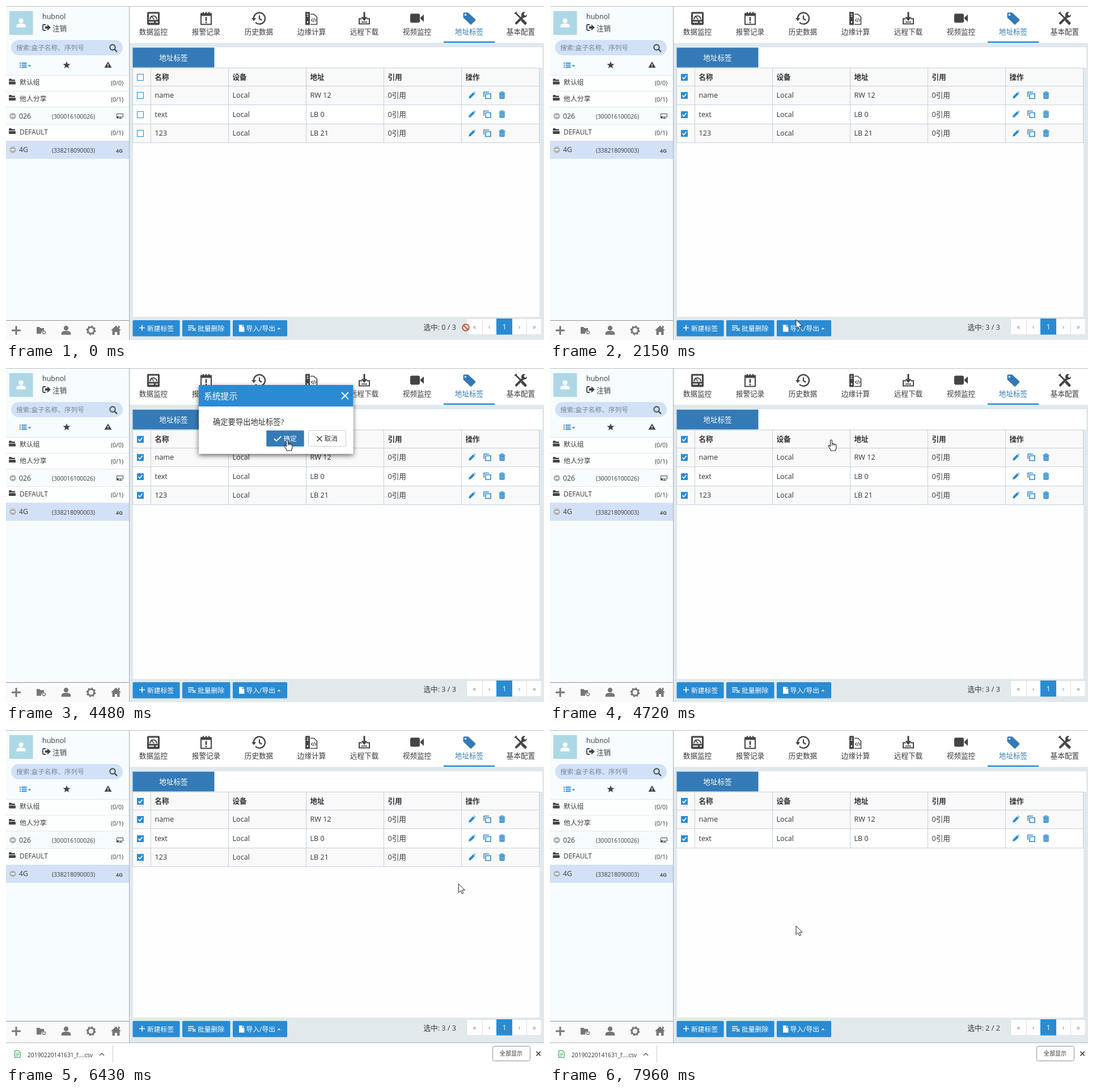
These frames come from a looping animation (949 by 590 pixels, 8 s). An HTML page:

```html
<!DOCTYPE html>
<html lang="zh-CN">
<head>
<meta charset="utf-8">
<title>地址标签</title>
<style>
html, body { margin: 0; width: 100%; height: 100%; overflow: hidden; background: #e1e9ed; }
svg { display: block; width: 100vw; height: 100vh; }
text { font-family: "Open Sans", "Noto Sans CJK SC", "Noto Sans CJK", sans-serif; white-space: pre; }
</style>
</head>
<body>
<svg id="stage" viewBox="0 0 949 590"></svg>
<script>
const LOOP = 8000;
const BLUE = '#2a8bd3', DEEP = '#337ab7', INK = '#444', GREY = '#777', LINE = '#c3d1de';

// markup helpers
const rect = (x, y, w, h, fill, more = '') =>
  `<rect x="${x}" y="${y}" width="${w}" height="${h}" fill="${fill}" ${more}/>`;
const circle = (x, y, r, fill, more = '') => `<circle cx="${x}" cy="${y}" r="${r}" fill="${fill}" ${more}/>`;
const fillPath = (d, fill = INK, more = '') => `<path d="${d}" fill="${fill}" ${more}/>`;
const stroke = (d, color = INK, w = 2, more = '') =>
  `<path d="${d}" fill="none" stroke="${color}" stroke-width="${w}" ${more}/>`;
const at = (x, y, body) => `<g transform="translate(${x} ${y})">${body}</g>`;
const group = (id, body) => `<g id="${id}">${body}</g>`;
// text placed by its vertical centre
const text = (x, cy, s, size = 12.6, fill = '#3a3a3a', more = '') =>
  `<text x="${x}" y="${(cy + size * .36).toFixed(1)}" font-size="${size}" fill="${fill}" ${more}>${s}</text>`;
const MID = 'text-anchor="middle"', BOLD = 'font-weight="700"', SEMI = 'font-weight="500"';

const icons = {
  gauge: rect(-11, -11, 22, 23, INK, 'rx="2"') + rect(-8, -8, 16, 11, '#fff') +
    stroke('M-6 2A6 6 0 0 1 6 2', INK, 2) + stroke('M1 2L-4 -4', INK, 1.6) +
    rect(-8, 6, 9, 2, '#fff') + rect(4, 6, 4, 2, '#fff'),
  alarm: rect(-9, -8, 18, 19, '#fff', `stroke="${INK}" stroke-width="2"`) + rect(-9, -8, 18, 4, INK) +
    stroke('M-5 -11V-5M0 -11V-5M5 -11V-5', INK, 2.2) + rect(-1.3, -2, 2.6, 7, INK) + rect(-1.3, 6.5, 2.6, 2.5, INK),
  history: stroke('M-9 1A10 10 0 1 1 -6 7.5', INK, 2.4) + fillPath('M-13 0H-4.5L-9 5Z') +
    stroke('M1 -5V1L5.5 3.5', INK, 2.2),
  edge: rect(-11, -11, 8, 23, INK) + stroke('M-8.5 -7H-5.5M-8.5 -3.5H-5.5', '#fff', 1.4) +
    circle(-7, 7, 1.4, '#fff') + stroke('M-2 -7H4L9.5 -2V11H-2', INK, 1.6) +
    stroke('M2 1L-.5 3.5L2 6M6 1L8 3.5L6 6M4.7 0L3.3 7', INK, 1.2),
  download: stroke('M-4 1H-9V10H9V1H4', INK, 2) + rect(-1.5, -11, 3, 10, INK) + fillPath('M-5.5 -2H5.5L0 5Z') +
    rect(-5, 6, 10, 1.6, INK),
  video: rect(-12, -8, 17, 16, INK, 'rx="3"') + fillPath('M6 -1L12 -6.5V6.5L6 1Z'),
  tag: fillPath('M-10.5 -8Q-10.5 -10 -8.5 -10H-2L11 2Q11.5 3 11 4L4 11Q3 12 2 11L-10.5 -1Z', DEEP) +
    circle(-6.5, -6, 1.8, '#fff'),
  tools: stroke('M-8 9L4 -3', INK, 4, 'stroke-linecap="round"') + circle(6, -6, 5, INK) +
    fillPath('M5 -7L9 -12L13 -8L8 -4Z', '#fff') +
    stroke('M-9 -9L1 1', INK, 2.6) + stroke('M3 4L8 9', INK, 5, 'stroke-linecap="round"') + stroke('M-11 -8L-7 -11', INK, 2)
};

const folder = (x, y) => at(x, y, fillPath('M0 0Q0 -5 1 -5H4L5.5 -3.5H11V-1H0Z') + rect(0, 0, 12, 5, INK, 'rx="1"'));
const offline = y => circle(12, y, 5.7, '#b3b3b3') + rect(9, y - 1, 6, 2, '#fff');
const person = c => circle(0, -4, 4.2, c) + fillPath('M-8.2 7.7V5Q-8 1.5 -3 1H3Q8 1.5 8.2 5V7.7Z', c);
const caret = (x, y, c, dir) => fillPath(`M${x - 3} ${y}H${x + 3}L${x} ${y + 3 * dir}Z`, c);
const star = Array.from({ length: 10 }, (_, i) => {
  const a = i * Math.PI / 5 - Math.PI / 2, r = i % 2 ? 2.9 : 6.8;
  return (r * Math.cos(a)).toFixed(1) + ' ' + (r * Math.sin(a)).toFixed(1);
}).join('L');
// eight teeth: each dash and gap is 1/16 of the outer ring
const gear = (r, c) => circle(0, 0, r, 'none', `stroke="${c}" stroke-width="${r * .5}"`) +
  circle(0, 0, r * 1.3, 'none', `stroke="${c}" stroke-width="${r * .4}" stroke-dasharray="${r * .511}"`);

const sidebar = () => {
  const line = y => rect(0, y, 217, 1, '#e4e9ec');
  let s = rect(0, 0, 217, 590, '#f7fcfe') + rect(6, 9, 41.5, 42, '#add8e6') + at(26.5, 30, person('#fff'));
  s += text(64, 18, 'hubnol', 12.5) + text(82, 39, '注销');
  s += stroke('M70 33H66.5Q65 33 65 34.5V41.5Q65 43 66.5 43H70', INK, 1.8) + fillPath('M69 36H73V32.5L79 38L73 43.5V40H69Z');
  s += rect(9, 60, 197, 27, '#d1e1f7', 'rx="13.5"') + text(18, 74, '搜索:盒子名称、序列号', 11.7, '#7c8794');
  s += circle(188, 73, 4.7, 'none', `stroke="${INK}" stroke-width="1.9"`) + stroke('M191.5 76.5L196 81', INK, 2.3);
  for (const y of [100, 103.5, 107]) s += rect(24, y, 2, 2, BLUE) + rect(27.5, y, 9, 2, BLUE);
  s += caret(41.5, 104.5, BLUE, 1) + at(107, 104.5, fillPath(`M${star}Z`));
  s += fillPath('M180 98L186.5 109H173.5Z') + rect(179.3, 102, 1.4, 3.5, '#fff') + rect(179.3, 106.5, 1.4, 1.4, '#fff');
  s += rect(0, 123, 217, 55, '#fdfefe') + rect(0, 209, 217, 29, '#fdfefe') + rect(0, 238, 217, 32, '#d3e1f7');
  s += [122, 150, 178, 209].map(line).join('');
  for (const [y, name, n] of [[135, '默认组', 0], [163.5, '他人分享', 1], [222.5, 'DEFAULT', 1]])
    s += folder(5, y - 1.5) + text(24, y, name, 11.9) + text(185, y + 1.5, `(0/${n})`, 10.5);
  for (const [y, name, id] of [[194.5, '026', '(300016100026)'], [254, '4G', '(338218090003)']])
    s += offline(y) + text(23, y, name, 12.3) + text(81, y + 1, id, 10.2);
  s += stroke('M195.5 190.5H206.5V196H195.5ZM202 196V198.5M199 198.5H205', INK, 1) + rect(195, 195, 3.5, 3.5, INK);
  return s + text(194, 256, '4G', 9, '#333', 'font-weight="600"');
};

const header = () => {
  const names = ['数据监控', '报警记录', '历史数据', '边缘计算', '远程下载', '视频监控', '地址标签', '基本配置'];
  const xs = [260, 353, 446, 539, 632, 725, 817, 908];
  let s = rect(218, 0, 731, 65, '#fff');
  Object.values(icons).forEach((icon, i) => {
    s += at(xs[i], 21.5, icon) + text(xs[i], 45.5, names[i], 12.6, i == 6 ? DEEP : '#3a3a3a', MID);
  });
  return s + rect(772, 62.5, 90, 2.5, BLUE) + rect(0, 0, 949, 1, '#b9bdbf') + rect(217, 0, 1, 590, '#a9afb2');
};

const checkbox = y => rect(231.5, y - 5.5, 11, 11, '#fff', `stroke="${BLUE}"`) +
  `<g class="tick">` + rect(231, y - 6, 12, 12, BLUE, 'rx="1"') + stroke(`M233.5 ${y}L236 ${y + 2.7}L240.5 ${y - 3}`, '#fff', 1.7) + '</g>';

const actions = y => at(822, y, fillPath('M-6 6L-5 2L2 -5L5 -2L-2 5ZM3 -6L4 -6.5L6.5 -4L6 -3Z', BLUE)) +
  at(849, y, stroke('M-6 3V-5.5H3M-3 -2.5H6V6H-3Z', BLUE, 1.6)) +
  at(875, y, rect(-5.5, -4.5, 11, 1.6, BLUE) + stroke('M-2 -4V-5.8H2V-4', BLUE, 1.2) +
    fillPath('M-4.5 -2.5H4.5V5.5Q4.5 6.5 3.5 6.5H-3.5Q-4.5 6.5 -4.5 5.5Z', BLUE) + stroke('M-1.7 -1V5M1.7 -1V5', '#fff', .8));

const COLS = [255, 392, 529, 666, 803];
// a row fills the space under the line at y0 and ends with the line at y1
const tableRow = (y0, y1, bg, cells, more = '') => {
  const cy = Math.floor((y0 + y1) / 2) + 1, h = y1 - y0;
  return rect(224, y0 + 1, 717, h, bg) + [223, ...COLS, 940].map(x => rect(x, y0 + 1, 1, h, LINE)).join('') +
    rect(224, y1, 717, 1, LINE) + checkbox(cy) +
    cells.map((c, i) => text(COLS[i] + 7.5, cy - .2, c, 12.6, '#333', more)).join('');
};

const table = () => {
  const lineY = i => Math.round(141.1 + 33.3 * i);
  let s = rect(224, 73, 722, 36, '#fff') + rect(224, 109, 717, 445, '#fefefe') + rect(223.5, 73.5, 144, 35, DEEP);
  s += text(295.5, 91, '地址标签', 12.6, '#fff', `${MID} ${SEMI}`) + rect(224, 109, 717, 1, LINE);
  s += tableRow(109, 141, '#f9f9f9', ['名称', '设备', '地址', '引用', '操作'], BOLD);
  [['name', 'RW 12'], ['text', 'LB 0'], ['123', 'LB 21']].forEach(([name, addr], i) => {
    const y0 = lineY(i), y1 = lineY(i + 1);
    s += group('row' + i, tableRow(y0, y1, i % 2 ? '#fff' : '#f9f9f9', [name, 'Local', addr, '0引用']) + actions((y0 + y1) / 2));
  });
  return s;
};

const button = (x, w, label, tx) => rect(x, 555, w, 28.5, BLUE, 'rx="1.5"') + text(tx, 569.5, label, 11.8, '#fff', SEMI);

const bottom = () => {
  let s = rect(218, 549, 731, 100, '#e1e9ed') + rect(0, 555, 217, 90, '#fafafa') + rect(0, 555, 217, 1, '#8f9496') + rect(217, 549, 1, 90, '#a9afb2');
  s += at(18, 573, stroke('M-8 0H8M0 -8V8', GREY, 3));
  s += at(62, 573, fillPath('M-8 6V-6H-3L-1 -4H5V0Q0 0 0 6Z', GREY) + at(5, 3.5, gear(2.4, GREY)));
  s += at(106, 573, person(GREY)) + at(150, 573, gear(5.7, GREY));
  s += at(194, 573, fillPath('M0 -8.5L9 0H6.5V8H2V3H-2V8H-6.5V0H-9ZM4 -8H6.5V-4H4Z', GREY));
  s += button(223.5, 83, '新建标签', 249) + button(311, 84.5, '批量删除', 338) + button(400, 96, '导入/导出', 423.5);
  s += stroke('M235 568.5H245M240 563.5V573.5', '#fff', 1.6);
  s += stroke('M321 565H331M321 568.5H331M321 572H327', '#fff', 1.6) + stroke('M329 569L334.5 574M334.5 569L329 574', '#fff', 1.3);
  s += fillPath('M411 563H416.5V567H420.5V575.5H411ZM417.5 563L420.5 566H417.5Z', '#fff') + caret(481.5, 571, '#fff', -1);
  s += group('count', '');
  s += rect(812.5, 552.5, 132, 28, '#fff', 'stroke="#dde1e4"') + [840, 892, 918].map(x => rect(x, 553, 1, 27, '#dde1e4')).join('');
  s += rect(865, 552, 28, 28.5, BLUE);
  [['«', 826.5], ['‹', 852.5], ['1', 879], ['›', 905.5], ['»', 932]].forEach(([c, x]) => {
    s += text(x, 566.5, c, 11.8, c == '1' ? '#fff' : '#888', MID);
  });
  return s;
};

const shelf = () => rect(0, 552, 949, 60, '#fff') + rect(0, 552, 949, 1, '#b4b4b4') +
  stroke('M15.5 566.5H22L25 569.5V578.5H15.5Z', '#3aa655', 1.2) + stroke('M17.5 571H23M17.5 573.5H23M17.5 576H21', '#3aa655', 1.1) +
  circle(20, 572, 9.3, 'none', 'id="ring" stroke="#4285f4" stroke-width="1.7"') +
  `<clipPath id="nameClip"><rect id="nameBox" x="0" y="552" width="0" height="40"/></clipPath>` +
  `<g clip-path="url(#nameClip)">` + text(38, 574, '20190220141631_f....csv', 10.2, '#333') + '</g>' +
  group('itemEnd', stroke('M-23 575L-19 571L-15 575', '#555', 1.4) + rect(0, 557, 1, 30, '#ccc')) +
  rect(858.5, 558.5, 66, 26, '#fff', 'rx="3" stroke="#8f8f8f"') + text(891, 571.5, '全部显示', 10.1, '#333', MID) +
  stroke('M935.5 568L943 575.5M943 568L935.5 575.5', '#555', 1.8);

const dialog = () => rect(340, 30, 272.5, 121.5, '#fff', 'filter="url(#shade)"') + rect(340, 30, 272.5, 38, BLUE) +
  text(349, 49.5, '系统提示', 14.8, '#fff') + stroke('M592 43L604 55M604 43L592 55', '#fff', 2) +
  group('question', '') +
  rect(459.5, 110.5, 66, 28, DEEP, 'stroke="#6aa5dc" rx="1"') + stroke('M473 125L477 129L485.5 120.5', '#fff', 1.8) +
  text(489.5, 125, '确定', 11.7, '#fff', SEMI) +
  rect(533.5, 110.5, 66, 28, '#fff', 'stroke="#ccc" rx="1"') + stroke('M548.5 120.5L557.5 129.5M557.5 120.5L548.5 129.5', '#333', 1.4) +
  text(561.5, 125, '取消', 11.7, '#333');

const menu = () => rect(400, 466, 118, 87, '#fff', 'filter="url(#soft)" stroke="#ccc" rx="2"') +
  rect(400.5, 498, 117, 25, '#f0f0f0') +
  ['导入标签', '导出标签', '下载模板'].map((s, i) => text(414, 484.5 + i * 26, s, 12.2, '#333')).join('');

const cursors =
  group('arrow', fillPath('M0 0V15.5L3.6 12.2L6 17.5L8.4 16.4L6 11.2H11Z', '#fff', 'stroke="#222"')) +
  group('hand', fillPath('M-1.5 1Q0 -1 1.5 1V7Q3 6 4 7.3Q5.5 6.5 6.5 8Q8.5 7.5 9 9.5V14Q8.5 16 7.5 19H-.5Q-2 15 -5 11.5Q-5.5 9.5 -3.5 9.5L-1.5 11.5Z', '#fff', 'stroke="#222" stroke-width="1.1"') +
    stroke('M1.5 7V10M4 8V10M6.5 8.5V10', '#222', .9)) +
  group('no', circle(0, 0, 5.8, '#f3e6e0', 'stroke="#c0532f" stroke-width="2"') + stroke('M-4 -4L4 4', '#c0532f', 2));

const stage = document.getElementById('stage');
const shadow = (id, dy, blur, a) => `<filter id="${id}" x="-20%" y="-20%" width="140%" height="150%"><feDropShadow dx="0" dy="${dy}" stdDeviation="${blur}" flood-opacity="${a}"/></filter>`;
stage.innerHTML = '<defs>' + shadow('shade', 3, 4, .6) + shadow('soft', 4, 4, .2) + '</defs>' +
  rect(0, 0, 949, 590, '#e1e9ed') + sidebar() + header() + table() + group('bottom', bottom()) +
  group('menu', menu()) + group('shelf', shelf()) + group('dialog', dialog()) +
  group('status', rect(-1, 575.5, 316, 16, '#fff', 'stroke="#c8c8c8" rx="2"') + text(0, 583.5, 'qa.fbox.flexem.net/app/#', 9.3, '#666')) +
  group('pointer', cursors);

const $ = id => document.getElementById(id);
const ticks = [...document.querySelectorAll('.tick')];
const show = (el, on) => { el.style.display = on ? '' : 'none'; };
const move = (el, x, y) => el.setAttribute('transform', `translate(${x.toFixed(2)} ${y.toFixed(2)})`);
const put = (el, html) => { if (el.dataset.html !== html) el.innerHTML = el.dataset.html = html; };
const between = (t, a, b) => t >= a && t < b;
const part = (t, a, d) => Math.min(1, Math.max(0, (t - a) / d));

// pointer path: time, x, y
const PATH = [
  [0, 811, 568], [80, 811, 568], [330, 660, 481], [690, 447, 563], [920, 447, 563], [1380, 237, 129],
  [1690, 237, 129], [2150, 434, 554], [2230, 434, 554], [2390, 447, 563], [2550, 447, 563], [2930, 450, 498],
  [3390, 450, 498], [4080, 496, 127], [5100, 496, 127], [5280, 479, 351], [5810, 479, 351], [6580, 833, 263],
  [6660, 833, 263], [6900, 876, 221], [7110, 876, 221], [7260, 809, 216], [7340, 809, 216], [7420, 494, 142],
  [7490, 494, 142], [7570, 496, 118], [7730, 496, 118], [7960, 434, 346], [8000, 434, 346]
];
const HAND = [[620, 990], [2330, 3310], [4000, 5130], [6850, 7140], [7420, 7760]];

function pointerAt(t) {
  const i = Math.max(1, PATH.findIndex(k => k[0] > t));
  const [a, x, y] = PATH[i - 1], [b, u, v] = PATH[i];
  const p = part(t, a, b - a), e = p * p * (3 - 2 * p);
  return [x + (u - x) * e, y + (v - y) * e];
}

function draw(t) {
  const removed = t >= 7800, rise = part(t, 4740, 120), checked = t >= 1610;
  ticks.forEach(el => show(el, checked));
  show($('row2'), !removed);
  put($('count'), text(736.5, 567.5, '选中: ' + (removed ? '2 / 2' : checked ? '3 / 3' : '0 / 3'), 12.6));

  show($('menu'), between(t, 2470, 3310));
  show($('status'), between(t, 2700, 3620));
  show($('dialog'), between(t, 3310, 4560) || between(t, 7110, 7730));
  put($('question'), text(365, 95.5, t < 6000 ? '确定要导出地址标签?' : '确定要删除该地址标签?', 13.3, '#333'));

  move($('bottom'), 0, -41 * rise);
  move($('shelf'), 0, 38 * (1 - rise));
  show($('shelf'), rise > 0);
  const w = 188 * (1 - (1 - part(t, 4860, 540)) ** 2);
  move($('itemEnd'), w, 0);
  $('nameBox').setAttribute('width', Math.max(0, w - 25));
  const pulse = part(t, 4850, 2500);
  $('ring').setAttribute('opacity', pulse > 0 ? Math.cos(pulse * Math.PI * 5) / 2 + .5 : 0);

  const kind = t < 80 ? 'no' : HAND.some(([a, b]) => between(t, a, b)) ? 'hand' : 'arrow';
  for (const k of ['arrow', 'hand', 'no']) show($(k), k === kind);
  move($('pointer'), ...pointerAt(t));
}

const start = performance.now();
function frame() {
  draw((performance.now() - start) % LOOP);
  requestAnimationFrame(frame);
}
frame();
</script>
</body>
</html>
```
